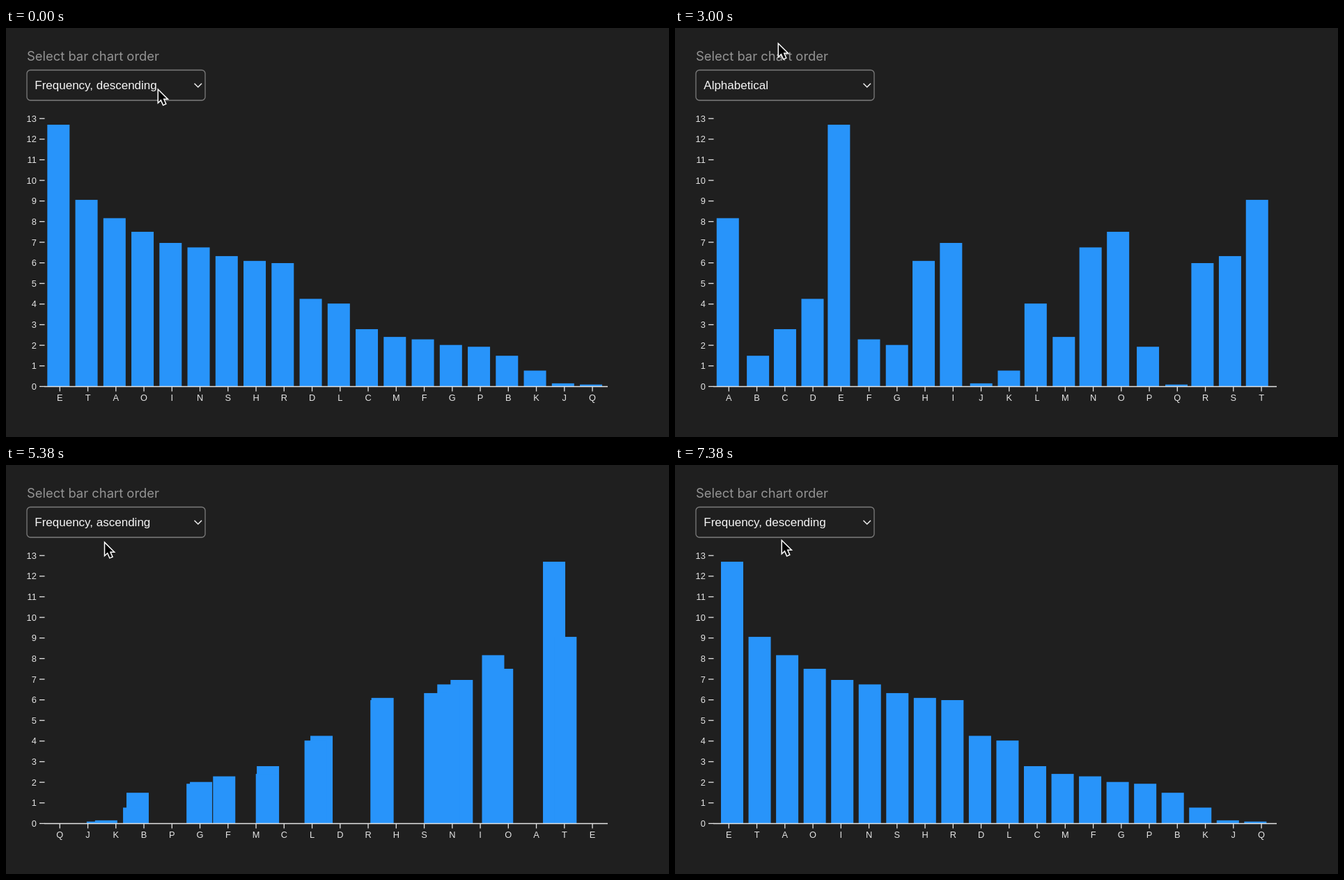
An HTML page with a canvas that plays this animation: 952 px wide and 588 px high, repeating every 7.51 s.

```html
<!DOCTYPE html>
<html lang="en">
<head>
<meta charset="utf-8">
<title>Sortable bar chart</title>
<style>
  html, body { margin: 0; width: 100%; height: 100%; overflow: hidden; background: #1f1f1f; }
  canvas { display: block; }
</style>
</head>
<body>
<canvas width="952" height="588"></canvas>
<script>
const ctx = document.querySelector('canvas').getContext('2d');
const LOOP = 7510, STEP = 125, STEPS = 60, SORT_TIME = 500;
const SANS = '"Liberation Sans", Arial, sans-serif', UI = 'Inter, sans-serif';

const freq = {
  E: 12.702, T: 9.056, A: 8.167, O: 7.507, I: 6.966, N: 6.749, S: 6.327, H: 6.094, R: 5.987, D: 4.253,
  L: 4.025, C: 2.782, M: 2.406, F: 2.288, G: 2.015, P: 1.929, B: 1.492, K: 0.772, J: 0.153, Q: 0.095
};
const letters = Object.keys(freq);
const options = ['Alphabetical', 'Frequency, ascending', 'Frequency, descending'];
const orders = [[...letters].sort(), [...letters].reverse(), letters];

// Each menu opens, then closes as the chart takes its new order.
const menus = [
  { open: 875, sort: 2557, top: 6, from: 2, to: 0 },
  { open: 4125, sort: 5015, top: 62.5, from: 0, to: 1 },
  { open: 6000, sort: 6940, top: 34.5, from: 1, to: 2 }
];

// Pointer stops: time, x, y
const stops = [
  [0, 218, 88], [125, 213, 88], [750, 213, 88], [1625, 155, 29], [1900, 155, 29], [2500, 148, 22],
  [3400, 148, 22], [4125, 145, 86], [4400, 145, 86], [4800, 140, 113], [5250, 140, 113],
  [5950, 155, 88], [6250, 155, 88], [6700, 153, 109], [7375, 153, 108]
];

const clamp = (v, lo, hi) => Math.min(hi, Math.max(lo, v));
const mix = (a, b, p) => a + (b - a) * p;
const smooth = p => p * p * (3 - 2 * p);
const cubicInOut = p => p < 0.5 ? 4 * p ** 3 : 1 - 4 * (1 - p) ** 3;
const yOf = v => 515.4 - 29.63 * v;
const slot = i => 40.25 * i;

function text(str, x, y, font, color, align = 'left', spacing = 0) {
  ctx.font = font;
  ctx.fillStyle = color;
  ctx.textAlign = align;
  ctx.letterSpacing = spacing + 'px';
  ctx.fillText(str, x, y);
}

function line(points, color, width) {
  ctx.beginPath();
  points.forEach(([x, y]) => ctx.lineTo(x, y));
  ctx.strokeStyle = color;
  ctx.lineWidth = width;
  ctx.stroke();
}

function box(x, y, w, h, r) {
  ctx.beginPath();
  ctx.roundRect(x, y, w, h, r);
}

function pointerAt(t) {
  const i = stops.findIndex(s => s[0] > t);
  if (i < 0) return stops.at(-1).slice(1);
  const [a, b] = [stops[i - 1], stops[i]];
  const p = smooth((t - a[0]) / (b[0] - a[0]));
  return [mix(a[1], b[1], p), mix(a[2], b[2], p)];
}

function drawChart(t) {
  const change = menus.findLast(m => t >= m.sort);
  const to = orders[change ? change.to : 2];
  const from = orders[change ? change.from : 2];
  const p = change ? cubicInOut(clamp((t - change.sort) / SORT_TIME, 0, 1)) : 1;

  ctx.fillStyle = '#2894fa';
  for (const c of letters) {
    const x = 59.3 + slot(mix(from.indexOf(c), to.indexOf(c), p));
    ctx.fillRect(x, yOf(freq[c]), 32, 515.4 - yOf(freq[c]));
  }
  const font = '12.8px ' + SANS, color = '#e4e4e4';
  for (let v = 0; v <= 13; v++) {
    line([[48, yOf(v)], [55.5, yOf(v)]], color, 1.3);
    text(v, 43.8, yOf(v) + 4.6, font, color, 'right');
  }
  line([[55, 515.5], [864, 515.5]], color, 1.3);
  to.forEach((c, i) => {
    const x = 77.3 + slot(i);
    line([[x, 515.5], [x, 522.5]], color, 1.3);
    text(c, x, 536.3, font, color, 'center');
  });
  return change ? change.to : 2;
}

function drawSelect(option) {
  text('Select bar chart order', 30, 47.3, '18.4px ' + UI, '#949494');
  box(30, 60.5, 256, 43.5, 5);
  ctx.strokeStyle = '#7c7c7c';
  ctx.lineWidth = 1.3;
  ctx.stroke();
  text(options[option], 41.3, 88, '17px ' + SANS, '#f6f6f6');
  line([[270.5, 79.8], [275.8, 85], [281, 79.8]], '#f0f0f0', 1.5);
}

function drawMenu(menu, t, pointerY) {
  const { top } = menu;
  ctx.save();
  ctx.globalAlpha = clamp((menu.sort - 30 - t) / 160, 0, 1);

  const tint = ctx.createLinearGradient(20, top, 275, top + 96);
  tint.addColorStop(0, '#2f2322');
  tint.addColorStop(1, '#292527');
  ctx.save();
  ctx.shadowColor = 'rgba(0,0,0,.45)';
  ctx.shadowBlur = 14;
  ctx.shadowOffsetY = 4;
  box(20, top, 255.5, 96, 6.5);
  ctx.fillStyle = tint;
  ctx.fill();
  ctx.restore();
  box(20.5, top + 0.5, 254.5, 95, 6);
  ctx.strokeStyle = '#5c5654';
  ctx.lineWidth = 1;
  ctx.stroke();

  const active = clamp(Math.floor((pointerY - top - 5) / 28.3), 0, 2);
  box(26, top + 6 + active * 28.3, 244, 28, 5);
  ctx.fillStyle = '#174fb6';
  ctx.fill();

  options.forEach((name, i) => {
    const y = top + 20.2 + i * 28.3;
    text(name, 50.3, y + 6, '16.5px ' + UI, '#f2f0f0', 'left', -0.2);
    if (i === menu.from) line([[32.3, y + 1.2], [35.8, y + 5], [42.6, y - 5]], '#fff', 2);
  });
  ctx.restore();
}

const arrow = new Path2D('M1 2V18L4.7 14.6 8 22 10.8 20.8 7.6 13.6H12.6Z');
function drawPointer(x, y) {
  ctx.save();
  ctx.translate(x, y);
  ctx.lineWidth = 3;
  ctx.strokeStyle = '#fff';
  ctx.stroke(arrow);
  ctx.fillStyle = '#000';
  ctx.fill(arrow);
  ctx.restore();
}

function draw(now) {
  const t = Math.min(Math.floor((now % LOOP) / STEP), STEPS - 1) * STEP;
  const [x, y] = pointerAt(t);
  ctx.fillStyle = '#1f1f1f';
  ctx.fillRect(0, 0, 952, 588);
  drawSelect(drawChart(t));
  const menu = menus.find(m => t >= m.open && t < m.sort);
  if (menu) drawMenu(menu, t, y);
  drawPointer(x, y);
}

const start = performance.now();
function tick() {
  draw(performance.now() - start);
  requestAnimationFrame(tick);
}
tick();
</script>
</body>
</html>
```
